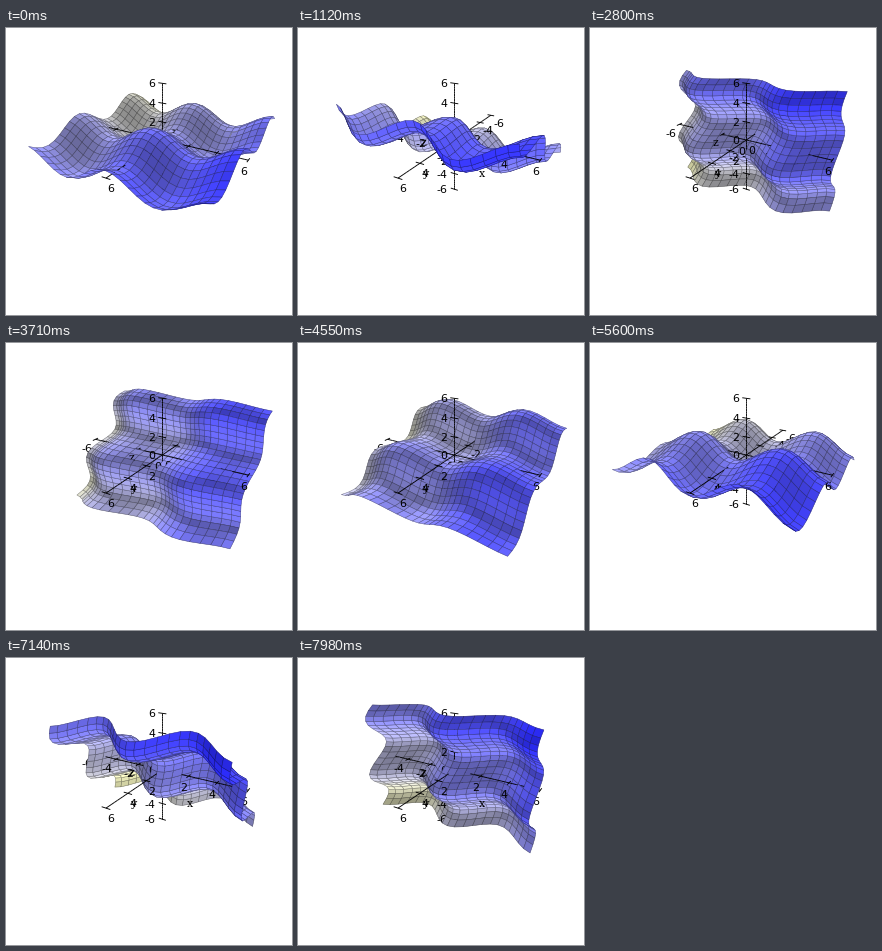
Write a matplotlib script that moves like this. It is 286 px wide and 287 px high and loops after 8000 ms.

```python
import numpy as np
import matplotlib.pyplot as plt
from matplotlib.animation import FuncAnimation
from matplotlib.collections import PolyCollection

WIDTH, HEIGHT, DPI = 286, 287, 72
LOOP_MS, TICK_MS = 8000, 40
CELLS, EXTENT, SPAN = 24, 6, 6.06
TURN = 2 * np.pi / 49
CENTER = np.array([156.3, 112.0])
ZOOM, PERSPECTIVE, Z_SCALE = 87.3, 0.27, 0.658
LABEL_LIFT, AXIS_LIFT = 0.05, 0.02

az, el = np.radians([59.5, 23.5])
RIGHT = np.array([np.sin(az), -np.cos(az), 0])
UP = np.array([-np.cos(az) * np.sin(el), -np.sin(az) * np.sin(el), np.cos(el)])
VIEW = np.array([np.cos(az) * np.cos(el), np.sin(az) * np.cos(el), np.sin(el)])

LIGHT = np.array([-0.3, -0.5, 0.81])
BLUE = np.array([0.22, 0.22, 1.25])
YELLOW = np.array([1.0, 1.0, 0.78])


def to_box(points):
    return np.asarray(points, float) * [1, 1, Z_SCALE] / EXTENT


def depth(points):
    return to_box(points) @ VIEW


def project(points):
    box = to_box(points)
    scale = ZOOM / (1 - PERSPECTIVE * (box @ VIEW))
    offset = np.stack([box @ RIGHT, -(box @ UP)], axis=-1)
    return CENTER + offset * scale[..., None]


def rotated_surface(angle):
    side = np.linspace(-SPAN, SPAN, CELLS + 1)
    x, y = np.meshgrid(side, side)
    height = np.sin(y) - np.cos(x)
    c, s = np.cos(angle), np.sin(angle)
    return np.stack([x, y * c + height * s, height * c - y * s], axis=-1)


def surface_quads(angle):
    p = rotated_surface(angle)
    quads = np.stack([p[:-1, :-1], p[:-1, 1:], p[1:, 1:], p[1:, :-1]], axis=2)
    return quads.reshape(-1, 4, 3)


def shade(quads):
    """Blend along x + y + z, lit from behind and above on both sides."""
    normal = np.cross(quads[:, 2] - quads[:, 0], quads[:, 3] - quads[:, 1])
    normal /= np.linalg.norm(normal, axis=1, keepdims=True)
    light = 0.62 + 0.5 * np.abs(normal @ LIGHT)
    level = np.clip(quads.mean(axis=1).sum(axis=1) / 24 + 0.5, 0, 1)
    color = YELLOW + (BLUE - YELLOW) * level[:, None]
    return np.clip(color * light[:, None], 0, 1)


def on_axis(axis, value):
    point = np.zeros(3)
    point[axis] = value
    return point


def axis_segments():
    segments = []
    stops = np.linspace(-EXTENT, EXTENT, 49)
    for axis in range(3):
        segments += [(on_axis(axis, a), on_axis(axis, b))
                     for a, b in zip(stops[:-1], stops[1:])]
        across = on_axis(1 if axis == 0 else 0, 0.3)
        for value in (-6, -4, -2, 2, 4, 6):
            tick = on_axis(axis, value)
            segments.append((tick - across, tick + across))
    return np.array([(a, b, b, a) for a, b in segments])


def axis_labels():
    """Yield text, screen position, depth, alignment and font of every label."""
    for axis in range(3):
        for value in range(-6, 7, 2):
            point = on_axis(axis, value)
            spot = project(point)
            align = "center"
            if axis == 0:
                spot = spot + ((-9, 9) if value < 0 else (-5, 11))
            elif axis == 1:
                spot = spot + ((8, 8) if value < 0 else (5, 10))
            else:
                spot = spot + (-7, 0)
                align = "right"
            yield str(value), spot, depth(point), align, "DejaVu Sans"
    for name, spot, point in (("x", (184, 145), (3, 0, 0)),
                              ("y", (127, 145), (0, 4, 0)),
                              ("z", (125, 114), (0, 0, 0))):
        yield name, spot, depth(point), "center", "DejaVu Serif"


fig = plt.figure(figsize=(WIDTH / DPI, HEIGHT / DPI), dpi=DPI, facecolor="white")
ax = fig.add_axes([0, 0, 1, 1])
ax.set_xlim(0, WIDTH)
ax.set_ylim(HEIGHT, 0)
ax.axis("off")

# Labels sit between depth layers, so the surface can cover part of them.
labels = sorted(axis_labels(), key=lambda item: item[2])
label_depths = np.array([item[2] for item in labels]) + LABEL_LIFT
layers = []
for i in range(len(labels) + 1):
    layer = PolyCollection([], zorder=2 * i)
    ax.add_collection(layer, autolim=False)
    layers.append(layer)
for i, (text, spot, _, align, font) in enumerate(labels):
    ax.text(*spot, text, ha=align, va="center_baseline", fontsize=11,
            family=font, color="black", zorder=2 * i + 1)

AXES = axis_segments()
BLACK = np.zeros((len(AXES), 3))
WIDTHS = np.repeat([0.5, 0.9], [CELLS ** 2, len(AXES)])
LIFTS = np.repeat([0, AXIS_LIFT], [CELLS ** 2, len(AXES)])


def step_at(ms):
    cycle, rest = divmod(ms, 3430)
    return 16 * cycle + max(0, (rest - 70) // 210)


def draw(frame):
    step = step_at(frame * TICK_MS + TICK_MS - 1)
    quads = surface_quads(np.pi - step * TURN)
    faces = shade(quads)
    shapes = np.concatenate([quads, AXES])
    fills = np.concatenate([faces, BLACK])
    edges = np.concatenate([faces * 0.55, BLACK])

    depths = depth(shapes.mean(axis=1)) + LIFTS
    order = np.argsort(depths)
    cuts = np.searchsorted(depths[order], label_depths)
    flat = project(shapes)
    for layer, part in zip(layers, np.split(order, cuts)):
        layer.set_verts(flat[part])
        layer.set_facecolor(fills[part])
        layer.set_edgecolor(edges[part])
        if len(part):
            layer.set_linewidth(WIDTHS[part])
    return layers


animation = FuncAnimation(fig, draw, frames=LOOP_MS // TICK_MS,
                          interval=TICK_MS, repeat=True, repeat_delay=0)
plt.show()
```
